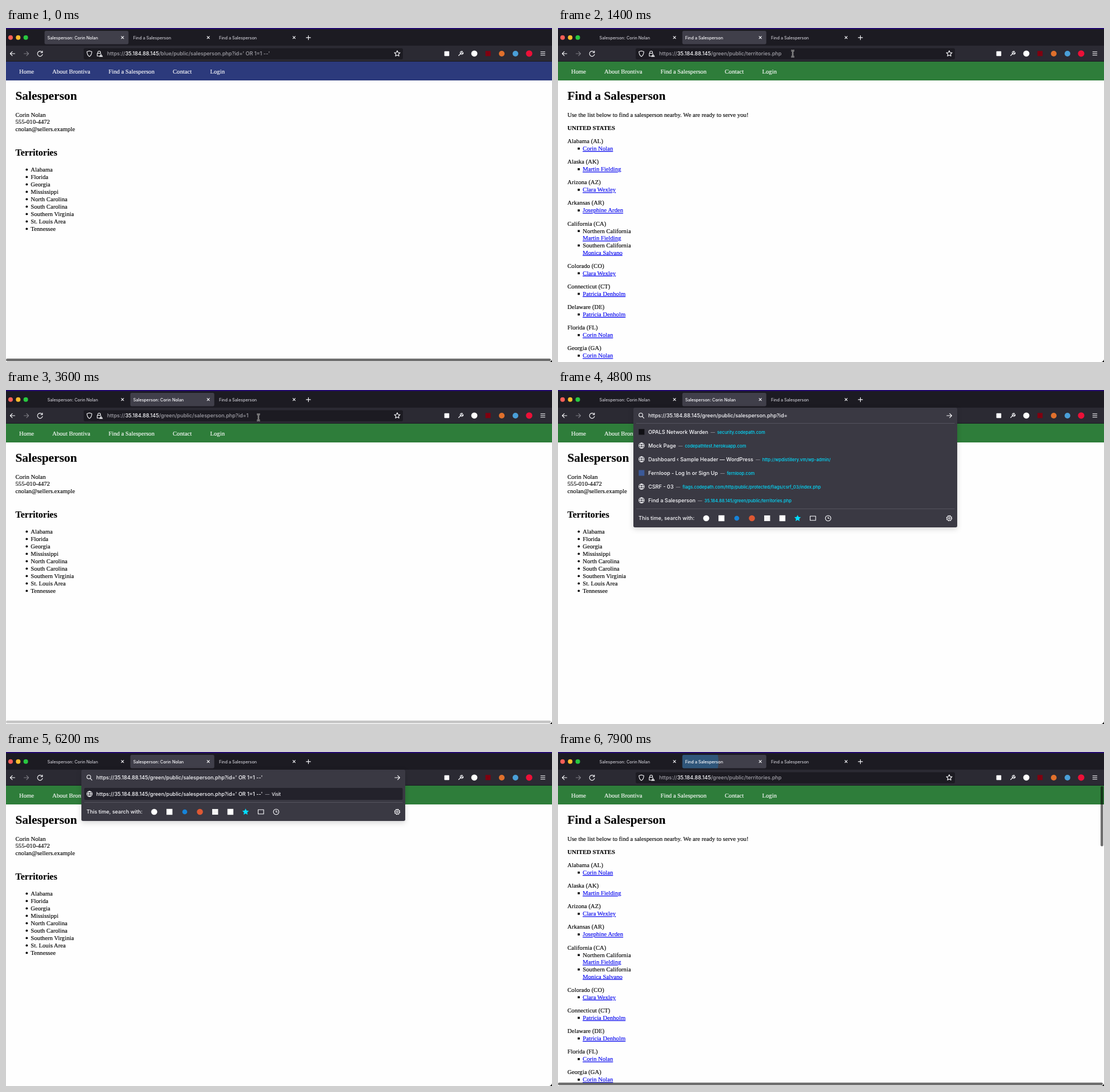
These frames come from a looping animation (956x586 px, 8000 ms). An HTML page:

```html
<!DOCTYPE html>
<html lang="en">
<head>
<meta charset="utf-8">
<title>Browser session</title>
<style>
html, body { margin: 0; width: 100%; height: 100%; overflow: hidden; background: #fefefe; }
svg { display: block; width: 956px; height: 586px; }
text { white-space: pre; }
.page { font: 10.667px "Liberation Serif", serif; color: #000; }
.page text { fill: currentColor; stroke: currentColor; stroke-width: .14px; }
.page .nav { color: #fff; }
.page .h1 { font-size: 21.333px; font-weight: bold; }
.page .h2 { font-size: 16px; font-weight: bold; }
.page .b { font-weight: bold; }
.page .link { color: #0000ee; text-decoration: underline; }
.ui { font: 500 9.1px Inter, sans-serif; fill: #fbfbfe; }
.ui .tab, .ui .small { font-size: 7.3px; }
.ui .dim { fill: #a3a2aa; }
.ui .sub { font-size: 7.6px; }
.ui .url { fill: #00ddff; }
.line { fill: none; stroke: #fbfbfe; stroke-width: 1.1; stroke-linecap: round; stroke-linejoin: round; }
</style>
</head>
<body>
<script>
const LOOP = 8000, STEP = 100;
const HOST = '35.184.88.145';
const PERSON = 'Corin Nolan';
const FIND = 'Find a Salesperson';
const PROFILE = 'Salesperson: ' + PERSON;
const INJECT = "' OR 1=1 --'";
const GREEN = '/green/public/';
const DETAIL = GREEN + 'salesperson.php?id=';

const text = (x, y, s, cls = '', more = '') =>
  `<text x="${x}" y="${y}" class="${cls}" ${more}>${s}</text>`;
const rect = (x, y, w, h, fill, more = '') =>
  `<rect x="${x}" y="${y}" width="${w}" height="${h}" fill="${fill}" ${more}/>`;
const dot = (x, y, r, fill, more = '') =>
  `<circle cx="${x}" cy="${y}" r="${r}" fill="${fill}" ${more}/>`;
const line = (d, more = '') => `<path class="line" d="${d}" ${more}/>`;
const ring = (x, y, r, more = '') => `<circle class="line" cx="${x}" cy="${y}" r="${r}" ${more}/>`;
const group = (id, body, more = '') => `<g id="${id}" ${more}>${body}</g>`;

function profilePage() {
  const areas = ['Alabama', 'Florida', 'Georgia', 'Mississippi', 'North Carolina',
    'South Carolina', 'Southern Virginia', 'St. Louis Area', 'Tennessee'];
  return text(16.5, 126, 'Salesperson', 'h1') +
    [PERSON, '555-010-4472', 'cnolan@sellers.example']
      .map((s, i) => text(16.5, 155.5 + i * 12.6, s)).join('') +
    text(16.5, 223.6, 'Territories', 'h2') +
    areas.map((s, i) => dot(36.3, 248.4 + i * 13, 1.9, '#000') +
      text(43.3, 251.5 + i * 13, s)).join('');
}

function listPage() {
  const north = 'Martin Fielding', west = 'Clara Wexley', east = 'Patricia Denholm';
  const states = [['Alabama (AL)', PERSON], ['Alaska (AK)', north], ['Arizona (AZ)', west],
    ['Arkansas (AR)', 'Josephine Arden'],
    ['California (CA)', 'Northern California|' + north, 'Southern California|Monica Salvano'],
    ['Colorado (CO)', west], ['Connecticut (CT)', east], ['Delaware (DE)', east],
    ['Florida (FL)', PERSON], ['Georgia (GA)', PERSON]];
  let out = text(16.5, 126, FIND, 'h1') +
    text(16.5, 155.5, 'Use the list below to find a salesperson nearby. We are ready to serve you!') +
    text(16.5, 178.8, 'UNITED STATES', 'b');
  let y = 202;
  for (const [state, ...items] of states) {
    out += text(16.5, y, state);
    y += 13;
    for (const item of items) {
      const parts = item.split('|');
      out += rect(34.5, y - 5.2, 3.6, 3.6, '#000');
      if (parts[1]) {
        out += text(43.3, y, parts[0]);
        y += 12.6;
      }
      out += text(43.3, y, parts[parts.length - 1], 'link');
      y += 12.75;
    }
    y += 10.4;
  }
  return out;
}

const navBar = () => rect(0, 59, 956, 33, '#2e7d3a', 'id="nav"') +
  [[23, 'Home'], [81, 'About Brontiva'], [179.5, FIND], [292, 'Contact'], [357.5, 'Login']]
    .map(([x, s]) => text(x, 80, s, 'nav')).join('');

function tabBar() {
  let out = rect(0, 0, 956, 31, '#1c1b22') + rect(0, 0, 956, 2, '#22086e') +
    [['#ff5f57', 8], ['#febc2e', 21.3], ['#28c840', 34.6]].map(([c, x]) => dot(x, 16.7, 4, c)).join('') +
    rect(67.5, 5, 147, 23.5, '#403f4a', 'rx="2.7" id="active"') +
    dot(226, 17, 0, '#1d6fb0', 'id="burst" clip-path="url(#tabClip)"');
  for (let i = 0; i < 3; i++) {
    const x = 67.5 + i * 150.2;
    out += text(x + 5, 19.8, FIND, 'tab', `id="tab${i}"`) +
      line(`M${x + 134.5} 14.7l4 4m0-4l-4 4`, 'stroke-width=".8"');
  }
  return out + dot(225, 16.7, 1.2, '#b9b8c0', 'id="throb"') + line('M529.5 13.2v7.4m-3.7-3.7h7.4');
}

function star(x, y, r) {
  const pts = Array.from({ length: 10 }, (_, i) => {
    const a = i * Math.PI / 5, q = i % 2 ? r * .48 : r;
    return `${(x + q * Math.sin(a)).toFixed(2)} ${(y - q * Math.cos(a)).toFixed(2)}`;
  });
  return 'M' + pts.join('L') + 'z';
}

function toolbar() {
  return rect(0, 31, 956, 28, '#2b2a33') + rect(0, 58.3, 956, .7, '#15141a') +
    line('M15.5 45H7.5m3.5-3.6L7.4 45l3.6 3.6') +
    line('M31.5 45h8m-3.5-3.6l3.6 3.6l-3.6 3.6', 'opacity=".4"') +
    line('M63.1 42.3A4.5 4.5 0 1 0 64 46.2M63.8 40.3v2.9h-2.9', 'id="reload"') +
    line('M56 41.5l7 7m0-7l-7 7', 'id="stop"') +
    rect(136, 35.5, 559, 19.5, '#1c1b22', 'rx="2.7"') +
    line('M146 40.2l4.2 1.4c0 4.2-1.2 6.8-4.2 8.4c-3-1.6-4.2-4.2-4.2-8.4z') +
    line('M160.8 44.5v-1.7a2.3 2.3 0 0 1 4.6 0v1.7M163 49.3h-3.2v-4.8h6') +
    '<path d="M166.3 45l3.4 5.5h-6.8z" fill="#fbfbfe"/>' + rect(165.9, 46.8, .8, 2, '#1c1b22') +
    text(177, 48.2, '', '', 'id="address"') +
    line(star(685, 45, 5.2)) +
    rect(767.5, 40.7, 8.6, 8.6, '#fbfbfe', 'rx="1"') +
    line('M792.5 48.5l4-4', 'stroke-width="2"') +
    line('M799.3 41.2l-1.8 1.8l.5 1.2l1.3.3l1.3-1.5a2.7 2.7 0 1 1-1.3-1.8', 'stroke-width="1.4"') +
    dot(820, 44.8, 5.4, '#fff') + rect(839.5, 40.3, 9, 9, '#800010') +
    dot(868, 45, 5, '#e0702c') + dot(892, 45, 5, '#4a9fd8') + dot(916, 44.8, 5.6, '#ec1038') +
    line('M936.3 41.7h7.4m-7.4 3h7.4m-7.4 3h7.4');
}

const globe = y => line(`M141.7 ${y}a4.6 4.6 0 1 0 9.2 0a4.6 4.6 0 1 0-9.2 0h9.2` +
  `M146.3 ${y - 4.6}c-2.8 2.5-2.8 6.7 0 9.2c2.8-2.5 2.8-6.7 0-9.2`, 'stroke-width=".9"');

const entry = (y, title, sub, cls) => text(158, y + 3.2, title +
  `<tspan class="sub dim" dx="4.2">—</tspan><tspan class="sub ${cls}" dx="3.9">${sub}</tspan>`);

function dropdown() {
  const rows = [
    ['OPALS Network Warden', 'security.codepath.com', '#101014'],
    ['Mock Page', 'codepathtest.herokuapp.com'],
    ['Dashboard ‹ Sample Header — WordPress', 'http://wpdistillery.vm/wp-admin/'],
    ['Fernloop - Log In or Sign Up', 'fernloop.com', '#3b5998'],
    ['CSRF - 03', 'flags.codepath.com/http/public/protected/flags/csrf_03/index.php'],
    [FIND, HOST + GREEN + 'territories.php']];
  const list = rows.map(([title, sub, mark], i) => {
    const y = 73.5 + i * 24;
    return group('row' + i, (mark ? rect(141.3, y - 5, 10, 10, mark) : globe(y)) + entry(y, title, sub, 'url'));
  }).join('');
  const visit = group('visit', rect(137, 63, 557.5, 21, '#23222b', 'rx="2"') + globe(73.5) + '<g id="visitText"></g>');
  const footer = group('footer', rect(137, -17, 557.5, .8, '#5b5a66') +
    text(141, 3.2, 'This time, search with:') +
    dot(259.5, 0, 5.3, '#fff') + rect(281, -5.2, 10.4, 10.4, '#fff') + dot(313, 0, 4.3, '#1683d8') +
    dot(339.5, 0, 5.3, '#de5833') + rect(361, -5, 10.4, 10, '#f4f4f4') + rect(387.7, -5.2, 10.4, 10.4, '#fff') +
    `<path d="${star(419.5, .2, 6)}" fill="#00ddff"/>` +
    line('M441.5-3.7h9.6v7.4h-9.6z') + ring(473, 0, 4.8) + line('M473-2.8v3h2.2') +
    ring(685, 0, 3.9) + ring(685, 0, 1.5) +
    '<circle cx="685" cy="0" r="4.7" fill="none" stroke="#fbfbfe" stroke-width="1.1" stroke-dasharray="1.8 1.9"/>');
  return group('drop', rect(132, 31, 567, 210, '#3a3943', 'rx="2.7" id="panel" filter="url(#shadow)"') +
    ring(145, 43.8, 3.3) + line('M147.5 46.3l3 3') +
    rect(158, 38.5, 0, 13, '#3f638b', 'id="select"') + text(158, 48.2, '', '', 'id="input"') +
    line('M680.8 45h8.6m-3.6-3.6l3.6 3.6l-3.6 3.6') +
    rect(137, 58, 557.5, .8, '#5b5a66', 'id="rule"') + list + visit + footer);
}

const IBEAM = 'M-2.5-5.5q2 0 2.5 1q.5-1 2.5-1M0-4.5V4.5M-2.5 5.5q2 0 2.5-1q.5 1 2.5 1';
const ARROW = 'M0 0v10.5l2.5-2.3l1.7 3.8l1.8-.8l-1.7-3.7h3.4z';
const cursors =
  group('ibeam', `<path d="${IBEAM}" fill="none" stroke="#fff" stroke-width="2.3"/>` +
    `<path d="${IBEAM}" fill="none" stroke="#000" stroke-width="1"/>`) +
  group('arrow', `<path d="${ARROW}" fill="#000" stroke="#fff" stroke-width=".9"/>`);

document.body.innerHTML = `<svg viewBox="0 0 956 586" xmlns="http://www.w3.org/2000/svg"><defs>
  <clipPath id="tabClip"><rect x="217.7" y="5" width="147" height="23.5" rx="2.7"/></clipPath>
  <linearGradient id="fade" gradientUnits="userSpaceOnUse" x1="336" x2="349" y1="0" y2="0">
    <stop offset="0" stop-color="#fbfbfe"/><stop offset="1" stop-color="#fbfbfe" stop-opacity="0"/></linearGradient>
  <filter id="shadow" x="-10%" y="-20%" width="120%" height="150%" color-interpolation-filters="sRGB">
    <feDropShadow dx="0" dy="3" stdDeviation="5" flood-opacity=".16"/></filter></defs>` +
  rect(0, 0, 956, 586, '#fefefe') +
  group('pages', navBar() + group('profile', profilePage()) + group('finder', listPage()), 'class="page"') +
  group('status', rect(-4, 574, 160.5, 14, '#403f4a', 'rx="2"') + text(-1.5, 583, HOST, 'small'), 'class="ui"') +
  rect(0, 580, 954, 4.7, '#000', 'id="hbar" rx="2.3"') +
  rect(950, 60, 4.7, 105.5, '#000', 'id="vbar" rx="2.3"') +
  '<path d="M956 581.5v4.5h-4.5q3.5-.8 4.5-4.5z" fill="#000"/>' +
  group('chrome', tabBar() + toolbar() + dropdown(), 'class="ui"') +
  group('cursor', cursors) + '</svg>';

const el = {};
document.querySelectorAll('[id]').forEach(n => el[n.id] = n);
const show = (id, on) => el[id].style.display = on ? '' : 'none';
const set = (id, attrs) => { for (const k in attrs) el[id].setAttribute(k, attrs[k]); };
const clamp = v => Math.max(0, Math.min(1, v));

// time, x, y
const path = [[200, 350, 120], [600, 290, 17], [1000, 290, 17], [1400, 411, 45], [1900, 411, 45],
  [2600, 60, 213], [2800, 59, 215], [3000, 59, 215], [3500, 442, 48], [4100, 442, 48], [4400, 426, 46], [4600, 426, 46]];

function cursorAt(t) {
  const i = path.findIndex(p => p[0] > t);
  if (i < 1) return null;
  const [a, b] = [path[i - 1], path[i]];
  const u = clamp((t - a[0]) / (b[0] - a[0])), e = u * u * (3 - 2 * u);
  return [a[1] + (b[1] - a[1]) * e, a[2] + (b[2] - a[2]) * e];
}

function barAlpha(t) {
  if (t < 700) return .56 * clamp(1 - (t - 300) / 200);
  if (t >= 3000 && t < 7000) return .56 * clamp(1 - (t - 3480) / 200);
  return t >= 7800 ? .56 : 0;
}

function draw(t) {
  const first = t < 700;
  const loading = t >= 2800 && t < 3000 || t >= 7700 && t < 7800;
  const listed = !first && t < 3000 || t >= 7800;
  const typed = INJECT.slice(0, Math.max(0, Math.floor((t - 5000) / 85)));

  set('nav', { fill: first ? '#2c3a7c' : '#2e7d3a' });
  show('profile', !listed);
  show('finder', listed);
  show('status', t >= 2800 && t < 3000);
  set('hbar', { opacity: barAlpha(t) });
  set('vbar', { opacity: t >= 7800 ? .56 : 0 });

  set('active', { x: first ? 67.5 : 217.7 });
  el.tab0.textContent = PROFILE;
  el.tab1.textContent = loading ? HOST + GREEN + 'salespe' : listed || first ? FIND : PROFILE;
  set('tab1', { x: loading ? 237 : 222.7 });
  ['tab0', 'tab1', 'tab2'].forEach((id, i) => {
    const on = i === (first ? 0 : 1);
    el[id].style.fill = on ? (loading ? 'url(#fade)' : '#fbfbfe') : '#c9c8d0';
  });
  show('throb', loading);
  set('throb', { cx: 225 + 3 * Math.sin((t % 2800) / 200) });
  const since = t >= 7800 ? t - 7800 : t - 3000;
  const burst = since >= 0 && since < 375;
  set('burst', { r: burst ? 10 + since * .45 : 0, opacity: .5 * clamp(1.2 - since / 375) });

  show('stop', t === 2900);
  show('reload', t !== 2900);
  set('reload', { transform: loading ? 'translate(0 1) rotate(120 59.5 45)' : '' });

  const route = first ? '/blue/public/salesperson.php?id=' + INJECT
    : t < 2800 || t >= 7800 ? GREEN + 'territories.php'
    : t < 7700 ? DETAIL + 1 : DETAIL + INJECT;
  el.address.innerHTML = `<tspan class="dim">https://</tspan>${HOST}<tspan class="dim">${route}</tspan>`;

  const open = t >= 4000 && t < 7700;
  show('drop', open);
  if (open) {
    const url = 'https://' + HOST + DETAIL + (t < 4600 ? '1' : typed);
    const rows = !typed ? 6 : t < 5500 ? 5 : 1;
    el.input.textContent = url;
    set('select', { width: t < 4300 ? el.input.getComputedTextLength() : 0 });
    show('visit', rows < 6);
    show('rule', rows === 6);
    for (let i = 0; i < 6; i++) show('row' + i, i < rows && (rows === 6 || i > 0));
    el.visitText.innerHTML = entry(73.5, url, 'Visit', '');
    set('panel', { height: 66 + rows * 24 });
    set('footer', { transform: `translate(0 ${81 + rows * 24})` });
  }

  const p = cursorAt(t);
  show('cursor', p);
  if (p) {
    const beam = p[1] > 35 && p[1] < 56 || t >= 2800 && t < 3100;
    show('ibeam', beam);
    show('arrow', !beam);
    set('cursor', { transform: `translate(${p[0]} ${p[1]})` });
  }
}

const start = performance.now();
function tick() {
  const t = (performance.now() - start) % LOOP;
  draw(Math.floor(t / STEP) * STEP);
  requestAnimationFrame(tick);
}
tick();
</script>
</body>
</html>
```
